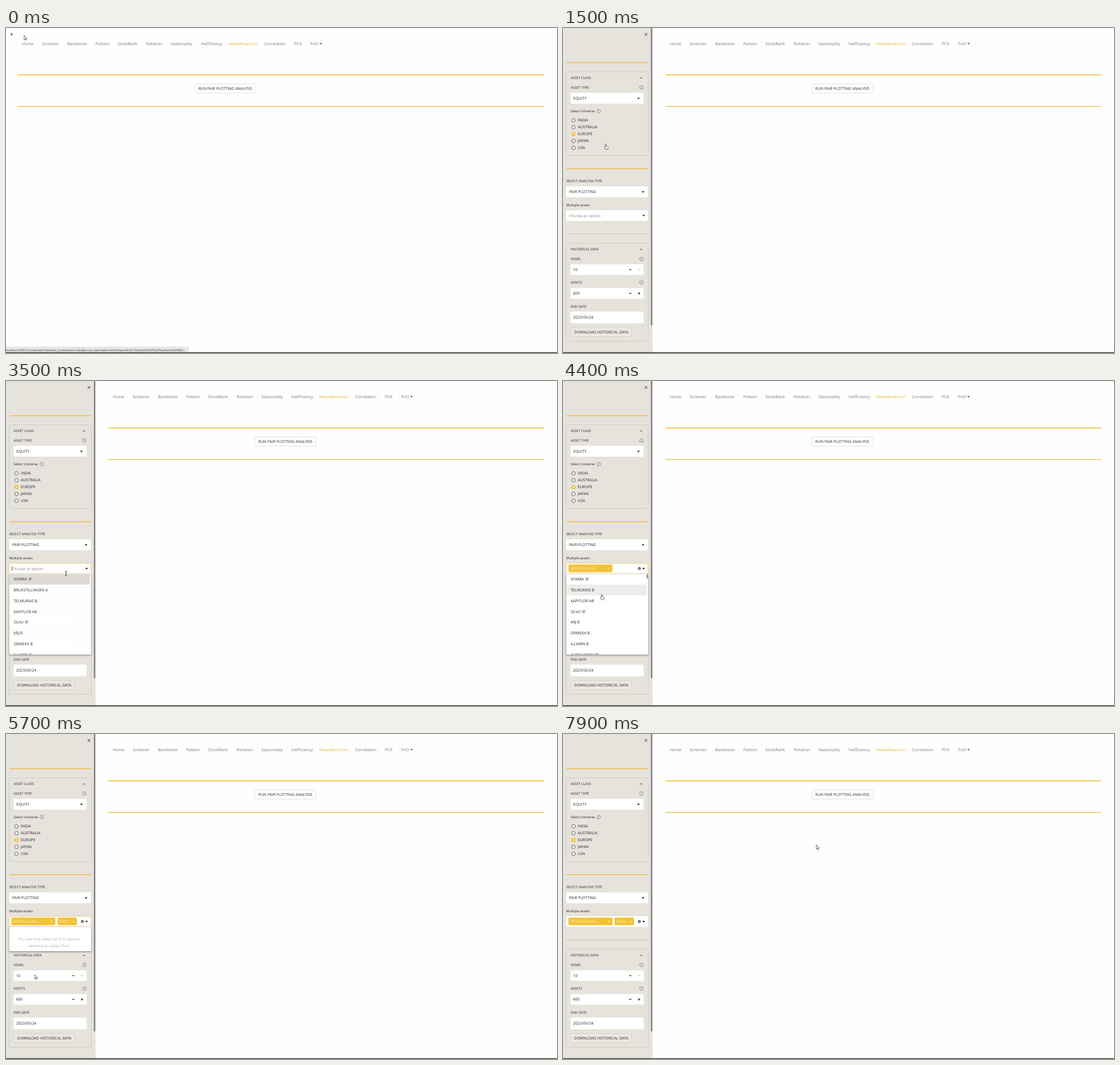
Write an HTML page that moves like this. It is 960x567 px and loops after 8 s.

```html
<!DOCTYPE html>
<html lang="en">
<head>
<meta charset="utf-8">
<title>Pair plotting</title>
<style>
html, body { margin: 0; width: 100%; height: 100%; overflow: hidden; background: #fefefe; }
svg { display: block; }
text { font: 6.65px "Open Sans", "Noto Sans", sans-serif; fill: #23242e; text-rendering: geometricPrecision; white-space: pre; }
.label { font-size: 5.93px; }
.nav { font-size: 7.08px; fill: #777; }
.on { fill: #eab440; }
.url { font-size: 5.33px; fill: #444; }
.dim { fill: #81828a; }
.msg { fill: #a8aeb9; text-anchor: middle; }
.chip { font-size: 6.3px; fill: #fff3cf; }
.line { stroke: #edbd42; stroke-width: 1.4; }
.box { fill: none; stroke: #cac7c0; stroke-width: .8; }
.field { fill: #fff; }
.icon { fill: none; stroke: #23242e; stroke-width: 1; }
.panel { filter: drop-shadow(0 1px 1.6px rgba(0, 0, 0, .5)); fill: #fff; }
.pointer { fill: #fff; stroke: #222; stroke-width: .65; stroke-linejoin: round; }
</style>
</head>
<body>
<svg id="stage" width="960" height="567" viewBox="0 0 960 567"></svg>
<script>
const LOOP = 8000, STEP = 100, SIDE = 156;
const ROW = 18.75, LIST_TOP = 336.5;
const T = { open: 400, list: 3500, pick1: 4100, pick2: 5600, close: 7300 };
const NAV = [['Home', 28], ['Screener', 63], ['Backtester', 107], ['Pattern', 156], ['StockRank', 194.5],
  ['Rotation', 244], ['Seasonality', 287], ['Inefficiency', 339.5], ['MeanReversion', 388],
  ['Correlation', 450], ['PCA', 502], ['FnO', 530.5]];
const ASSETS = ["VOMRA 'B'", 'BRUKSTILLINGEN A', 'TELMURIAS B', 'KAPITLOR AB', "OLVU 'B'",
  'KRJ B', 'ORMEKA B', 'ILLVARN B', 'ALPEN WISKLER'];

// Pointer path: time, x, y, shape from that time on
const PATH = [
  [0, 31.5, 13, 'arrow'], [300, 9, 10, 'hand'], [500, 22, 17, 'arrow'], [700, 80.2, 42, 'arrow'],
  [1000, 104, 152, 'arrow'], [1100, 104, 152, 'hand'], [1500, 73.8, 202, 'hand'], [1700, 77, 235, 'arrow'],
  [1900, 84, 279, 'hand'], [2100, 84, 279, 'hand'], [2400, 70, 350, 'arrow'], [2700, 105, 418, 'arrow'],
  [3000, 108, 335, 'beam'], [3500, 104.5, 336, 'beam'], [3700, 88, 347, 'hand'], [3900, 70, 361, 'hand'],
  [4300, 68, 362, 'hand'], [4800, 62, 412, 'hand'], [5000, 60.5, 427, 'hand'], [5100, 60, 432, 'hand'],
  [5300, 55, 425, 'hand'], [5500, 50, 420, 'hand'], [5700, 50, 420, 'arrow'], [6000, 110, 345, 'arrow'],
  [6200, 140, 300, 'beam'], [6300, 150, 282, 'beam'], [6400, 143, 290, 'arrow'], [6600, 131, 305, 'arrow'],
  [6700, 131.6, 305.5, 'arrow'], [6800, 131.6, 305.5, 'arrow'], [7000, 130.5, 306, 'arrow'],
  [7200, 130.5, 306, 'arrow'], [7900, 441.3, 193.5, 'arrow']];

const text = (x, y, s, cls = '') => `<text x="${x}" y="${y}" class="${cls}">${s}</text>`;
const rect = (x, y, w, h, cls, r = 2, more = '') =>
  `<rect x="${x}" y="${y}" width="${w}" height="${h}" rx="${r}" class="${cls}" ${more}/>`;
const path = (d, cls = '', more = '') => `<path d="${d}" class="${cls}" ${more}/>`;
const rule = (y, more = '') => path(`M6 ${y}H148`, 'line', more);
const caret = (x, y) => path(`M${x - 2.5} ${y - 1.2}h5l-2.5 2.6z`, '', 'fill="#23242e"');
const chevron = (x, y) => path(`M${x - 2} ${y + 1}l2 -2 2 2`, 'icon');
const cross = (x, y, r, more = '') => path(`M${x - r} ${y - r}l${2 * r} ${2 * r}m0 ${-2 * r}l${-2 * r} ${2 * r}`, 'icon', more);
const minus = (y, c) => path(`M115.2 ${y}h4`, 'icon', `style="stroke:${c};stroke-width:1.3"`);
const plus = (y, c) => path(`M130.5 ${y}h4m-2 -2v4`, 'icon', `style="stroke:${c};stroke-width:1.2"`);
const help = (x, y) => `<circle cx="${x}" cy="${y}" r="3.2" class="icon" style="stroke:#66666c;stroke-width:.65"/>` +
  `<text x="${x}" y="${y + 1.7}" style="font-size:4.8px;text-anchor:middle;fill:#55565c">?</text>`;
const radio = (name, i) => {
  const y = 161 + 12 * i, on = name === 'EUROPE';
  return `<circle cx="18.3" cy="${y}" r="${on ? 2.5 : 3.2}" fill="${on ? '#fff6da' : '#ece9e3'}"
    stroke="${on ? '#f2c02f' : '#44454c'}" stroke-width="${on ? 2.2 : .75}"/>` + text(25.8, y + 2.4, name);
};
const chip = (x, w, s) => rect(x, 320.2, w, 13.4, '', 1.5, 'fill="#f3c235"') + text(x + 3.8, 329.3, s, 'chip') +
  cross(x + w - 6, 327, 1.3, 'style="stroke:#fff6da;stroke-width:.8"');

const sidebar = rect(0, 0, SIDE, 566, '', 0, 'fill="#e6e3dc"') +
  rect(153, -3, 2.6, 522, '', 1.3, 'fill="#858585"') + cross(144.6, 11.2, 2.2) + rule(60.5) +
  rect(5.5, 76.5, 143, 146, 'box') + text(13.3, 89.3, 'ASSET CLASS', 'label') + chevron(136, 87.3) +
  text(13.3, 105.9, 'ASSET TYPE', 'label') + help(136.6, 103.8) +
  rect(13, 113, 127.5, 19, 'field') + text(18, 125.3, 'EQUITY') + caret(131.5, 123) +
  text(13.3, 147.2, 'Select Universe', 'label') + help(62.3, 145) +
  ['INDIA', 'AUSTRALIA', 'EUROPE', 'JAPAN', 'USA'].map(radio).join('') + rule(245.5) +
  text(5.5, 269, 'SELECT ANALYSIS TYPE', 'label') +
  rect(5.5, 276.3, 142.5, 19, 'field') + text(10.7, 288.4, 'PAIR PLOTTING') + caret(139.5, 286) +
  text(5.5, 310.5, 'Multiple assets', 'label') + rect(5.5, 318, 142.5, 18.5, 'field') + caret(140.5, 327.3) +
  rule(359.5, 'style="stroke:#c7bfad;stroke-width:1"') +
  rect(5.5, 375.5, 143, 171, 'box') + text(13.3, 388.2, 'HISTORICAL DATA', 'label') + chevron(136, 386.3) +
  text(13.3, 404.9, 'YEARS', 'label') + help(136.6, 402.8) +
  rect(13, 412.3, 127.5, 18.5, 'field') + text(17.5, 424, '10') + minus(421.6, '#7d2020') + plus(421.6, '#d5d5d8') +
  text(13.3, 446.1, 'ASSETS', 'label') + help(136.6, 444) +
  rect(13, 453.7, 127.5, 18.5, 'field') + text(17.5, 465.4, '600') + minus(463, '#23242e') + plus(463, '#23242e') +
  text(13.3, 487.6, 'END DATE', 'label') + rect(13, 494.7, 127.5, 20.5, 'field') + text(17.5, 507.4, '2023/05/24') +
  rect(13.5, 522.8, 106, 16, '', 2, 'fill="#ebe8e2" stroke="#cfccc5" stroke-width=".8"') +
  text(19.3, 533.4, 'DOWNLOAD HISTORICAL DATA');

const listRows = names => names.map((s, i) => text(13.2, LIST_TOP + ROW * i + 11.9, s)).join('');

const shapes = {
  arrow: path('M0 0V7.4L1.7 5.9 2.9 8.6 4.1 8 2.9 5.4H5.2Z', 'pointer'),
  hand: path('M0 .6Q.8 -.4 1.4 .6V4L4.2 4.6Q5 4.9 4.8 6.2L4.1 9.6H.2L-1.9 6.4Q-2 5.3 -1 5.5L0 6.3Z', 'pointer'),
  beam: path('M-1.6 -3.8H1.6M0 -3.8V3.8M-1.6 3.8H1.6', 'icon', 'style="stroke-width:.85"')
};

const stage = document.getElementById('stage');
stage.innerHTML = `
  <g id="nav">${NAV.map(([s, x]) => text(x, 30.1, s, s === 'MeanReversion' ? 'nav on' : 'nav')).join('')}
    ${path('M546 26.2h5l-2.5 2.6z', '', 'fill="#555"')}</g>
  <g style="stroke:#ecbc30"><line id="rule1" x2="937.7" y1="81.8" y2="81.8" stroke-width="1.6"/>
    <line id="rule2" x2="937.7" y1="136.9" y2="136.9" stroke-width="1.3"/></g>
  <g id="run">${rect(0, 97.5, 106.3, 16, '', 2, 'fill="#fff" stroke="#d9d9dd" stroke-width=".8"')}
    ${text(6, 108.3, 'RUN PAIR PLOTTING ANALYSIS')}</g>
  <g id="opener">${path('M8.6 9l2.1 2.1 -2.1 2.1', 'icon', 'style="stroke-width:1.2"')}</g>
  <svg id="side" height="567">${sidebar}</svg>
  <g id="select">
    <g id="hint">${text(10.4, 329.5, 'Choose an option', 'dim')}</g>
    <g id="chip1">${chip(9.5, 76.5, 'BRUKSTILLING...')}
      <circle cx="133" cy="327" r="2.5" fill="#55565c"/>${cross(133, 327, .9, 'style="stroke:#fff;stroke-width:.6"')}</g>
    <g id="chip2">${chip(90, 33.6, 'KRJ B')}</g>
    <g id="focus">${rect(5.7, 318.2, 142.2, 18, '', 2, 'fill="none" stroke="#f0c55a" stroke-width=".8"')}</g>
    <path id="bar" class="icon" d="M10.2 323v8.5" style="stroke-width:.6"/>
  </g>
  <g id="list">${rect(5.5, LIST_TOP, 143, 141, 'panel', 1.5)}
    ${rect(6, 0, 140, ROW, '', 0, 'id="trail" fill="#faf9f6"')}${rect(6, 0, 140, ROW, '', 0, 'id="hover"')}
    <svg width="149" height="477.3"><g id="rows1">${listRows(ASSETS)}</g>
      <g id="rows2">${listRows(ASSETS.filter((_, i) => i !== 1))}
      ${rect(145.4, 337, 2.7, 7.5, '', 1, 'fill="#9a9a9a"')}</g></svg></g>
  <g id="full">${rect(5.5, LIST_TOP, 143, 42.5, 'panel', 1.5)}
    ${text(75.7, 360, 'You can only select up to 2 options.', 'msg')}${text(75.7, 371.9, 'Remove an option first.', 'msg')}</g>
  <g id="status">${rect(-2, 556.5, 319.7, 10, '', 1, 'fill="#e7e6e4" stroke="#d2d2d2" stroke-width=".5"')}
    ${text(0, 563.7, 'localhost:8501/component/hydralit_components.NavBar.nav_bar/index.html?streamlitUrl=http%3A%2F%2Flocalhost%3A850...', 'url')}</g>
  <rect y="565.8" width="960" height="1.2" fill="#222"/>
  <g id="pointer">${Object.entries(shapes).map(([k, s]) => `<g id="${k}">${s}</g>`).join('')}</g>`;

const ui = Object.fromEntries([...stage.querySelectorAll('[id]')].map(e => [e.id, e]));
const show = (id, on) => { ui[id].style.display = on ? '' : 'none'; };
const set = (id, name, value) => ui[id].setAttribute(name, value);

// CSS "ease": solve the x curve by bisection, return y
function ease(x) {
  if (x <= 0 || x >= 1) return x <= 0 ? 0 : 1;
  const bez = (a, b, u) => 3 * a * u * (1 - u) ** 2 + 3 * b * u * u * (1 - u) + u ** 3;
  let lo = 0, hi = 1;
  for (let i = 0; i < 24; i++) {
    const mid = (lo + hi) / 2;
    if (bez(.25, .25, mid) < x) lo = mid; else hi = mid;
  }
  return bez(.1, 1, lo);
}

function pointerAt(t) {
  let i = PATH.length - 1;
  while (i && PATH[i][0] > t) i--;
  const a = PATH[i], b = PATH[i + 1] || a;
  const k = b === a ? 0 : (t - a[0]) / (b[0] - a[0]);
  return { x: a[1] + (b[1] - a[1]) * k, y: a[2] + (b[2] - a[2]) * k, shape: a[3] };
}
const rowAt = t => Math.max(0, Math.min(6, Math.floor((pointerAt(t).y - LIST_TOP) / ROW)));
const rowTop = i => LIST_TOP + ROW * i;

function draw(t) {
  const p = ease((t - T.open) / 600), k = Math.min(1, p / .61);
  const left = 20.5 + 158 * k;
  set('nav', 'transform', `translate(${158 * k} 0)`);
  set('rule1', 'x1', left);
  set('rule2', 'x1', left);
  set('run', 'transform', `translate(${left + (937.5 - left) * .3364} 0)`);
  set('side', 'x', -SIDE * (1 - p));
  set('side', 'width', SIDE * k);
  set('select', 'transform', `translate(${-SIDE * (1 - p)} 0)`);
  show('side', k > 0);
  show('select', k > .9);
  show('opener', t <= T.open);
  show('status', t < 200);

  const open = t >= T.list && t < T.close, picked = t >= T.pick1;
  show('hint', !picked);
  show('chip1', picked);
  show('chip2', t >= T.pick2);
  show('focus', open);
  show('bar', open && !picked);
  show('list', open && t < T.pick2);
  show('full', open && t >= T.pick2);
  show('rows1', !picked);
  show('rows2', picked);
  set('list', 'opacity', t < T.list + STEP ? .93 : 1);
  set('hover', 'y', rowTop(rowAt(t)));
  set('hover', 'fill', t < 3700 ? '#dedbd6' : '#eeecea');
  set('trail', 'y', rowTop(rowAt(t - STEP)));

  const m = pointerAt(t);
  set('pointer', 'transform', `translate(${m.x} ${m.y})`);
  for (const s in shapes) show(s, s === m.shape);
}

function tick() {
  draw(Math.floor(performance.now() % LOOP / STEP) * STEP);
  requestAnimationFrame(tick);
}
tick();
</script>
</body>
</html>
```
